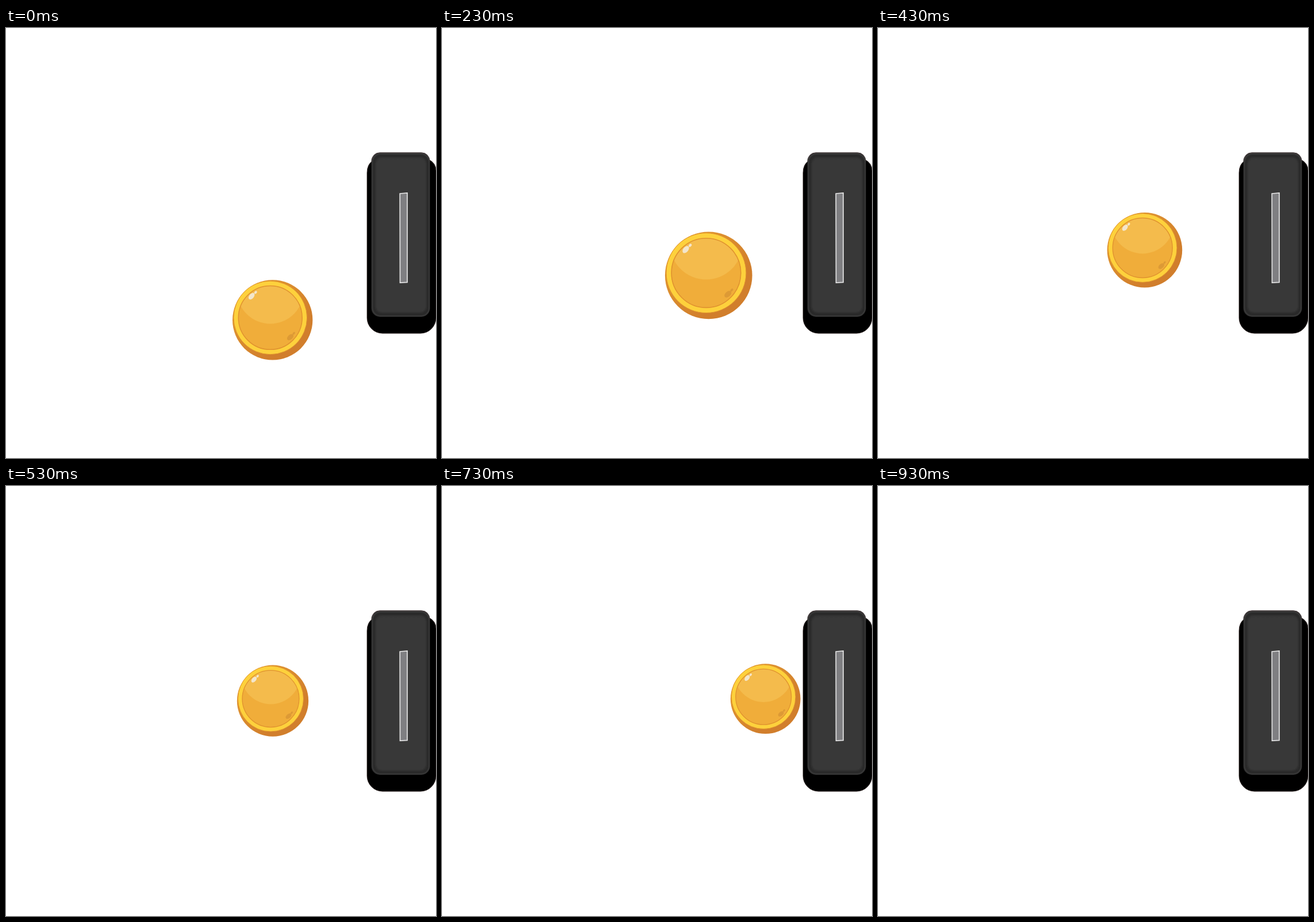
Animation of 748x748 px, one loop 1210 ms. Source, as an HTML page:

```html
<!DOCTYPE html>
<html lang="en">
<head>
<meta charset="utf-8">
<title>Coin into slot</title>
<style>
  html, body { margin: 0; width: 100%; height: 100%; overflow: hidden; background: #fff; }
  svg { display: block; width: 100vw; height: 100vh; }
</style>
</head>
<body>
<svg viewBox="0 0 748 748">
  <defs>
    <linearGradient id="panel" x2="0" y2="1">
      <stop offset="0" stop-color="#363636"/>
      <stop offset=".12" stop-color="#393939"/>
      <stop offset="1" stop-color="#373737"/>
    </linearGradient>
    <linearGradient id="rim" x2="1" y2="1">
      <stop offset=".1" stop-color="#e39a31"/>
      <stop offset=".7" stop-color="#d17e2c"/>
    </linearGradient>
    <filter id="soft" x="-10%" y="-10%" width="120%" height="120%">
      <feGaussianBlur stdDeviation="1.6"/>
    </filter>
    <clipPath id="face"><circle cx="-4.5" cy="-4.5" r="63"/></clipPath>
    <clipPath id="mouth"><rect width="694.5" height="748"/></clipPath>
  </defs>

  <g id="device">
    <path d="M638 231Q628 237 628 252V504A27 27 0 0 0 655 531.200H721A27 27 0 0 0 748 504V248Q748 235 736 229Z"
          fill="#000" stroke="#3a2c2a" stroke-opacity=".7"/>
    <rect x="635.500" y="216.500" width="102" height="286" rx="15" fill="#2a2a2a"/>
    <path d="M636.500 232Q637.500 217 651 217H722Q735.500 217 737 232" fill="none" stroke="#57494a"/>
    <rect x="637.500" y="219" width="98.500" height="282" rx="14" fill="none" stroke="#383838" stroke-width="2"/>
    <rect x="643" y="225" width="88" height="270" rx="10" fill="url(#panel)" filter="url(#soft)"/>
    <path d="M685.200 288L698 287V442.400L685.500 443.200Z" fill="#7f7f82" stroke="#e4e4e4" stroke-width="1.700"/>
  </g>

  <g clip-path="url(#mouth)">
    <g id="coin">
      <circle r="79.200" fill="url(#rim)"/>
      <circle cx="-4.5" cy="-4.5" r="72.500" fill="#fdd13c" stroke="#e0942f"/>
      <circle cx="-4.5" cy="-4.5" r="63" fill="#f0ad3a"/>
      <circle cx="-4.500" cy="-58.500" r="66" fill="#f4bb4c" clip-path="url(#face)"/>
      <circle cx="-4.5" cy="-4.5" r="63" fill="none" stroke="#e0922f" stroke-width="1.700"/>
      <g fill="#f3e6cc">
        <ellipse rx="4.600" ry="7.500" transform="translate(-41.500 -47) rotate(40)"/>
        <ellipse rx="2.300" ry="3.200" transform="translate(-33.500 -54.500) rotate(40)"/>
      </g>
      <g fill="#dd9a35">
        <ellipse rx="4.600" ry="7.500" transform="translate(35 34) rotate(48)"/>
        <ellipse rx="2" ry="3.200" transform="translate(42 26.500) rotate(40)"/>
      </g>
    </g>
  </g>
</svg>
<script>
  const LOOP = 1210, LAST = 28;
  const coin = document.getElementById('coin');

  // [step, value] keys at 30 steps per second
  const xKeys = [[0, 463.7], [16, 464], [17, 464.3], [20, 499], [24, 638], [28, 790]];
  const sizeKeys = [[0, 139], [4, 158], [5, 159.5], [10, 138.5], [16, 124], [20, 119.5], [24, 125.5], [28, 139]];

  function slope(keys, i) {
    const a = keys[Math.max(i - 1, 0)], b = keys[Math.min(i + 1, keys.length - 1)];
    return (b[1] - a[1]) / (b[0] - a[0]);
  }

  // Smooth cubic curve through the keys
  function curve(keys, k) {
    let i = 0;
    while (i < keys.length - 2 && k >= keys[i + 1][0]) i++;
    const [k0, v0] = keys[i], [k1, v1] = keys[i + 1];
    const h = k1 - k0, u = (k - k0) / h, w = 1 - u;
    return v0 * w * w * (1 + 2 * u) + v1 * u * u * (3 - 2 * u)
      + h * u * w * (slope(keys, i) * w - slope(keys, i + 1) * u);
  }

  const height = k => 370.2 + 137.7 * Math.pow(Math.max(0, 1 - k / 18), 1.68);

  function draw(now) {
    const t = now % LOOP;
    const k = Math.min(LAST, Math.floor((Math.floor(t / 10) * 3 + 1) / 10));
    coin.style.display = k < LAST ? '' : 'none';
    coin.setAttribute('transform',
      `translate(${curve(xKeys, k)} ${height(k)}) scale(${curve(sizeKeys, k) / 158})`);
  }

  let start;
  function tick(now) {
    start ??= now;
    draw(now - start);
    requestAnimationFrame(tick);
  }
  draw(0);
  requestAnimationFrame(tick);
</script>
</body>
</html>
```
